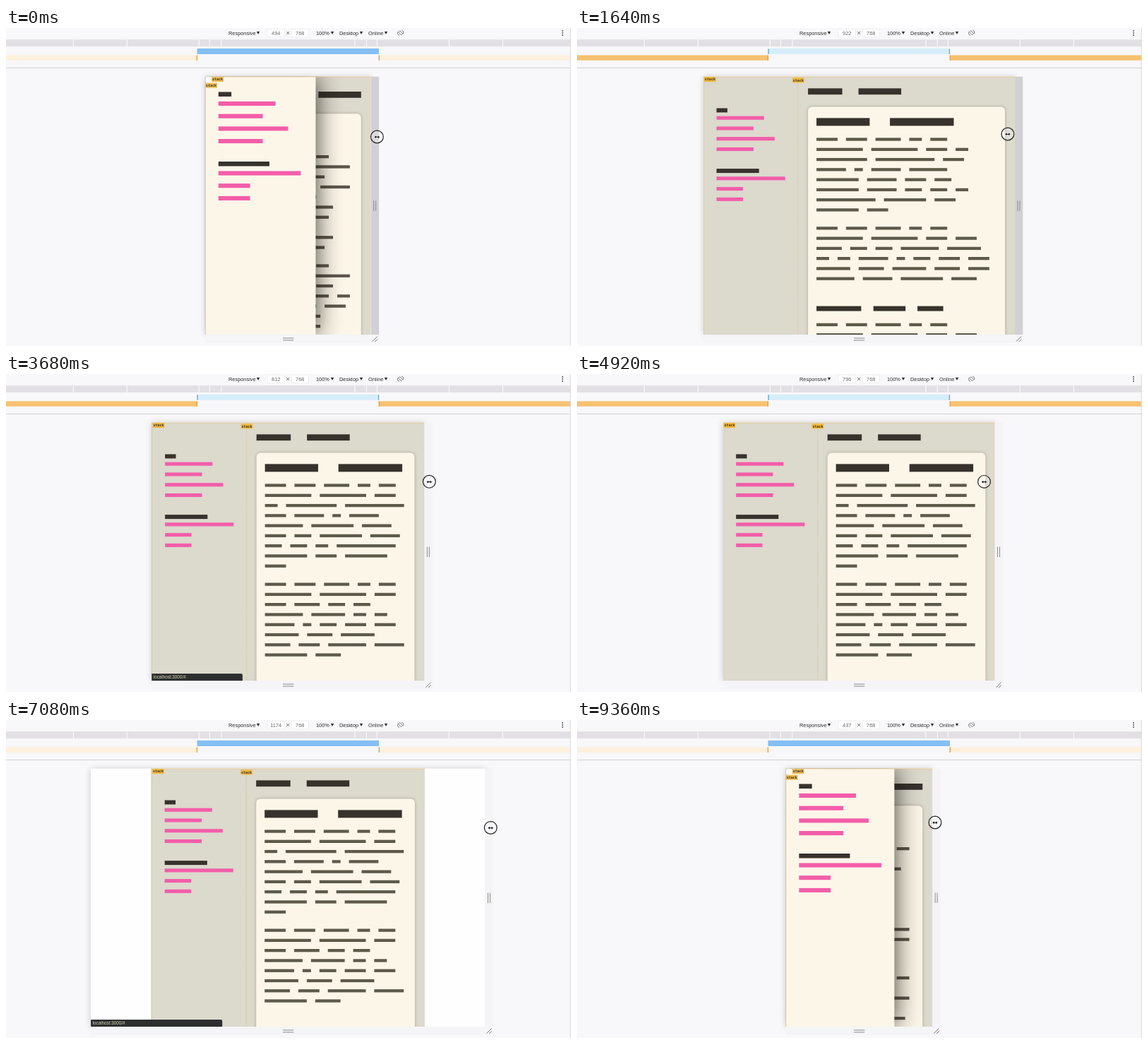
Write an HTML page with a canvas that moves like this. It is 800x450 px and loops after 9400 ms.

```html
<!DOCTYPE html>
<html lang="en">
<head>
<meta charset="utf-8">
<title>Responsive layout</title>
<style>
html, body { margin: 0; width: 100%; height: 100%; overflow: hidden; background: #f8f7f9; }
canvas { display: block; width: 800px; height: 450px; }
</style>
</head>
<body>
<canvas id="stage"></canvas>
<script>
const canvas = document.getElementById('stage');
const ctx = canvas.getContext('2d');
const dpr = window.devicePixelRatio || 1;
canvas.width = 800 * dpr;
canvas.height = 450 * dpr;

const LOOP = 9400, STEP = 40;
const SCALE = 0.4757, MID = 399.3, TOP = 68.8, BOTTOM = 434;
const BREAK = 541, UNIT = 5.97, LINE = 14.27;
const SANS = '"Liberation Sans", Arial, sans-serif';
const MONO = '"DejaVu Sans Mono", monospace';
const DARK = '#37322c', PINK = '#f35da9', CREAM = '#fcf6e9', SAND = '#dcd9cd';

// [time, viewport width] and [time, pointer height]
const WIDTHS = [
  [24, 494], [580, 928], [1640, 928], [2040, 394], [3200, 394], [3560, 812],
  [4900, 812], [5240, 454], [6840, 454], [7080, 1174], [8380, 1174],
  [8780, 494], [8980, 494], [9220, 437]
];
const HEIGHTS = [[0, 154], [700, 150], [1640, 150], [2100, 152.3], [8400, 152.5], [9280, 145]];
const STATUS = [[320, 720], [3520, 4000], [6960, 7480]];

// Word lengths in characters
const PARAS = [
  [5,5,6,3,4,11,11,5,3,12,14,5,7,2,7,9,10,7,5,4,10,7,4,4,3,14,10,5,10,5],
  [5,5,6,3,4,11,11,5,5,6,4,4,9,8,3,3,7,2,4,5,5,8,6,8,6,5,9,7,10,6]
];

function track(keys, t) {
  if (t <= keys[0][0]) return keys[0][1];
  for (let i = 1; i < keys.length; i++) {
    const [t0, a] = keys[i - 1], [t1, b] = keys[i];
    if (t < t1) {
      const x = (t - t0) / (t1 - t0);
      return a + (b - a) * x * x * (3 - 2 * x);
    }
  }
  return keys[keys.length - 1][1];
}

const widthAt = t => track(WIDTHS, t);
const leftOf = w => MID - w * SCALE / 2;
const rightOf = w => MID + w * SCALE / 2;

function box(x, y, w, h, color) {
  ctx.fillStyle = color;
  ctx.fillRect(x, y, w, h);
}

function shaded(blur, color, draw) {
  ctx.save();
  ctx.shadowBlur = blur * dpr;
  ctx.shadowColor = color;
  draw();
  ctx.restore();
}

function line(x0, y0, x1, y1, color, width = 1) {
  ctx.strokeStyle = color;
  ctx.lineWidth = width;
  ctx.beginPath();
  ctx.moveTo(x0, y0);
  ctx.lineTo(x1, y1);
  ctx.stroke();
}

function poly(color, ...pts) {
  ctx.fillStyle = color;
  ctx.beginPath();
  for (let i = 0; i < pts.length; i += 2) ctx.lineTo(pts[i], pts[i + 1]);
  ctx.fill();
}

function text(str, x, y, font, color, align = 'left') {
  ctx.font = font;
  ctx.fillStyle = color;
  ctx.textAlign = align;
  ctx.fillText(str, x, y);
}

function toolbar(label) {
  const font = '7.4px ' + SANS;
  for (const [str, x, arrow] of [['Responsive', 315, 357], ['100%', 439, 462], ['Desktop', 472, 503], ['Online', 513, 538]]) {
    text(str, x, 9.7, font, '#303030');
    poly('#303030', arrow - 2.2, 5, arrow + 2.2, 5, arrow, 9);
  }
  for (const [str, x] of [[label, 370], ['768', 404]]) {
    box(x, 1, 24.5, 12, '#e4e3e6');
    box(x + .5, 1.5, 23.5, 11, '#fff');
    text(str, x + 12.2, 9.8, font, '#666', 'center');
  }
  line(397.2, 5, 401.2, 9, '#555', .8);
  line(401.2, 5, 397.2, 9, '#555', .8);

  ctx.save();
  ctx.translate(558.6, 6.8);
  ctx.rotate(-Math.PI / 4);
  ctx.strokeStyle = '#666';
  ctx.lineWidth = .8;
  ctx.strokeRect(-1.5, -2.8, 3, 5.6);
  for (const a of [-.4, Math.PI - .4]) {
    ctx.beginPath();
    ctx.arc(0, 0, 4, a, a + 1.5);
    ctx.stroke();
  }
  ctx.restore();
  for (const y of [4, 7, 10]) box(787.2, y - .8, 1.7, 1.7, '#555');
}

function mediaBars(narrow) {
  box(0, 16.3, 799, 9.8, '#e2e0e4');
  for (const d of [94.5, 111, 126, 228, 304])
    for (const x of [MID - d, MID + d]) box(x - .5, 16.3, 1.2, 9.8, '#f8f7f9');

  box(270.5, 29, 257.5, 8, narrow ? '#84bff4' : '#d6eefa');
  if (!narrow) for (const x of [270.5, 526.8]) box(x, 29.5, 1.3, 7.5, '#69a5cc');
  const amber = narrow ? '#fdf0dc' : '#f8c170';
  box(0, 38.5, 270, 7.3, amber);
  box(528.5, 38.5, 270.5, 7.3, amber);
  for (const x of [269.7, 527.6]) box(x, 38.5, 1.4, 7.5, '#dda04e');
  box(0, 56, 799, .9, '#cfced2');
  box(798.8, 0, .8, 450, '#d5d4d8');
}

function nav(x, y, k) {
  const u = 7.47 * k, pitch = 14.75 * k;
  [[2, 9, 7, 11, 7], [8, 13, 5, 5]].forEach((list, g) => {
    const y0 = y + g * (k > 1 ? 98.5 : 85.6);
    list.forEach((n, i) => {
      if (!i) box(x, y0, n * u + .4, k > 1 ? 6.5 : 6, DARK);
      else box(x, y0 + 11.2 * k + (i - 1) * pitch, n * u, 5.1 * k, PINK);
    });
  });
}

function wrap(words, limit) {
  const rows = [];
  let row = [], used = 0;
  for (const n of words) {
    if (row.length && used + 2 + n > limit) {
      rows.push(row);
      row = [];
      used = 0;
    }
    row.push([row.length ? used + 2 : 0, n]);
    used += n + (row.length > 1 ? 2 : 0);
  }
  rows.push(row);
  return rows;
}

function article(x, y, w, color) {
  shaded(4, 'rgba(60,50,30,.32)', () => {
    ctx.fillStyle = CREAM;
    ctx.beginPath();
    ctx.roundRect(x, y, w, 420, 6);
    ctx.fill();
  });
  const left = x + 12, room = w - 24, tight = room < 194;
  box(left, y + 16, 75.3, 11, DARK);
  box(tight ? left : left + 104, y + (tight ? 31 : 16), 90.4, 11, DARK);

  let row = y + 46.2 + (tight ? 14.8 : 0);
  const para = words => {
    for (const line of wrap(words, room / UNIT)) {
      for (const [at, n] of line) box(left + at * UNIT, row - 2.2, n * UNIT, 4.3, color);
      row += LINE;
    }
  };
  para(PARAS[0]);
  row += 25.9 - LINE;
  para(PARAS[1]);
  row += 42.4 - LINE;
  for (const [at, n] of [[0, 63.3], [80.6, 45.5], [143, 36.5]]) box(left + at, row - 3.6, n, 7, DARK);
  row += 22.8;
  para(PARAS[1]);
}

function tag(x, y, color) {
  box(x, y, 16.6, 7, color);
  text('stack', x + 8.3, y + 5.2, 'bold 5px ' + MONO, '#3b2f16', 'center');
}

function page(w) {
  const narrow = w < BREAK, left = leftOf(w), right = rightOf(w), size = w * SCALE;
  box(left, TOP, size, BOTTOM - TOP, SAND);
  if (narrow) {
    const drawer = Math.max(154, size * 2 / 3);
    box(left + 14, 90, 48.5, 8.8, DARK);
    box(right - 74.5, 90, 60.5, 8.8, DARK);
    article(left + 14, 121.2, size - 28, '#5d554b');
    shaded(34, 'rgba(20,16,8,.85)', () => box(left, TOP, drawer, BOTTOM - TOP, CREAM));
    nav(left + 19, 90.5, 1.2);
  } else {
    const main = left + 134.5;
    box(main + 14, 85.4, 48.5, 8.8, DARK);
    box(main + 85.5, 85.4, 60.5, 8.8, DARK);
    article(main + 14, 111.4, right - main - 28, '#5d5a4a');
    nav(left + 19, 113.5, 1);
    ctx.setLineDash([1.5, 1.5]);
    line(main, TOP, main, BOTTOM, '#d8c49c', .8);
    ctx.setLineDash([]);
  }
  box(left, TOP - .3, size, .9, '#e4c078');
  box(left, TOP, .9, BOTTOM - TOP, '#e4c078');
  if (narrow) {
    box(left + 1, TOP + .6, 7.5, 6.6, '#fff');
    tag(left + 9.5, 69.2, '#e9bb5c');
    tag(left + .5, 77.7, '#e9bb5c');
  } else {
    tag(left + 1.5, 69.2, '#efb73e');
    tag(left + 126.5, 70.4, '#efb73e');
  }
}

function grips(left, right, hot) {
  box(right, TOP, 11.3, BOTTOM - TOP, hot ? '#d1d0d4' : '#f4f3f6');
  box(left, BOTTOM, right - left + 11.3, 11.5, '#f5f4f7');
  const x = right + 5.4, ink = '#8b8a8e';
  for (const d of [-1.5, 1.5]) line(x + d, 244.5, x + d, 259, ink);
  for (const y of [438.9, 441.9]) line(392, y, 407.3, y, ink);
  line(x - 3.4, 443.5, x + 3.6, 436.5, '#77767a');
  line(x + .4, 443.8, x + 3.8, 440.4, '#77767a');
}

function status(left, size) {
  ctx.fillStyle = '#2d2f2f';
  ctx.beginPath();
  ctx.roundRect(left, 424, size / 3, 10, [0, 2, 0, 0]);
  ctx.fill();
  text('localhost:3000/#', left + 2.6, 431, '6.3px ' + SANS, '#d3d0b4');
}

function pointer(x, y) {
  ctx.beginPath();
  ctx.arc(x, y, 8.9, 0, Math.PI * 2);
  ctx.fillStyle = 'rgba(255,255,255,.2)';
  ctx.fill();
  ctx.strokeStyle = '#222';
  ctx.lineWidth = 1.2;
  ctx.stroke();
  line(x - 3.5, y + .3, x + 3.5, y + .3, 'rgba(255,255,255,.8)', 3.6);
  line(x - 2, y + .3, x + 2, y + .3, '#111', 1.1);
  for (const d of [-1, 1]) poly('#111', x + d * 3.7, y + .3, x + d * 1.3, y - 1.7, x + d * 1.3, y + 2.3);
}

function draw(t) {
  ctx.setTransform(dpr, 0, 0, dpr, 0, 0);
  box(0, 0, 800, 450, '#f8f7f9');
  const w = widthAt(t), left = leftOf(w), right = rightOf(w), size = right - left;

  toolbar(String(Math.round(widthAt(t + 24))));
  // Media bars and page layout trail behind the viewport
  mediaBars(widthAt(t - 200) < BREAK);

  shaded(9, 'rgba(0,0,0,.2)', () => box(left, TOP, size, BOTTOM - TOP, '#fefefe'));
  grips(left, right, t < 2080);
  ctx.save();
  ctx.beginPath();
  ctx.rect(left, TOP - .4, size, BOTTOM - TOP + .4);
  ctx.clip();
  box(left, TOP, size, BOTTOM - TOP, '#fefefe');
  page(widthAt(t - 120));
  if (STATUS.some(([a, b]) => t >= a && t < b)) status(left, size);
  ctx.restore();

  const aim = widthAt(t + 93);
  const nudge = 3.7 + 4 * Math.min(1, Math.max(0, (aim - 454) / 450));
  pointer(rightOf(aim) + nudge, track(HEIGHTS, t));
}

const start = performance.now();
function tick() {
  const t = (performance.now() - start) % LOOP;
  draw(Math.floor(t / STEP) * STEP);
  requestAnimationFrame(tick);
}
tick();
</script>
</body>
</html>
```
